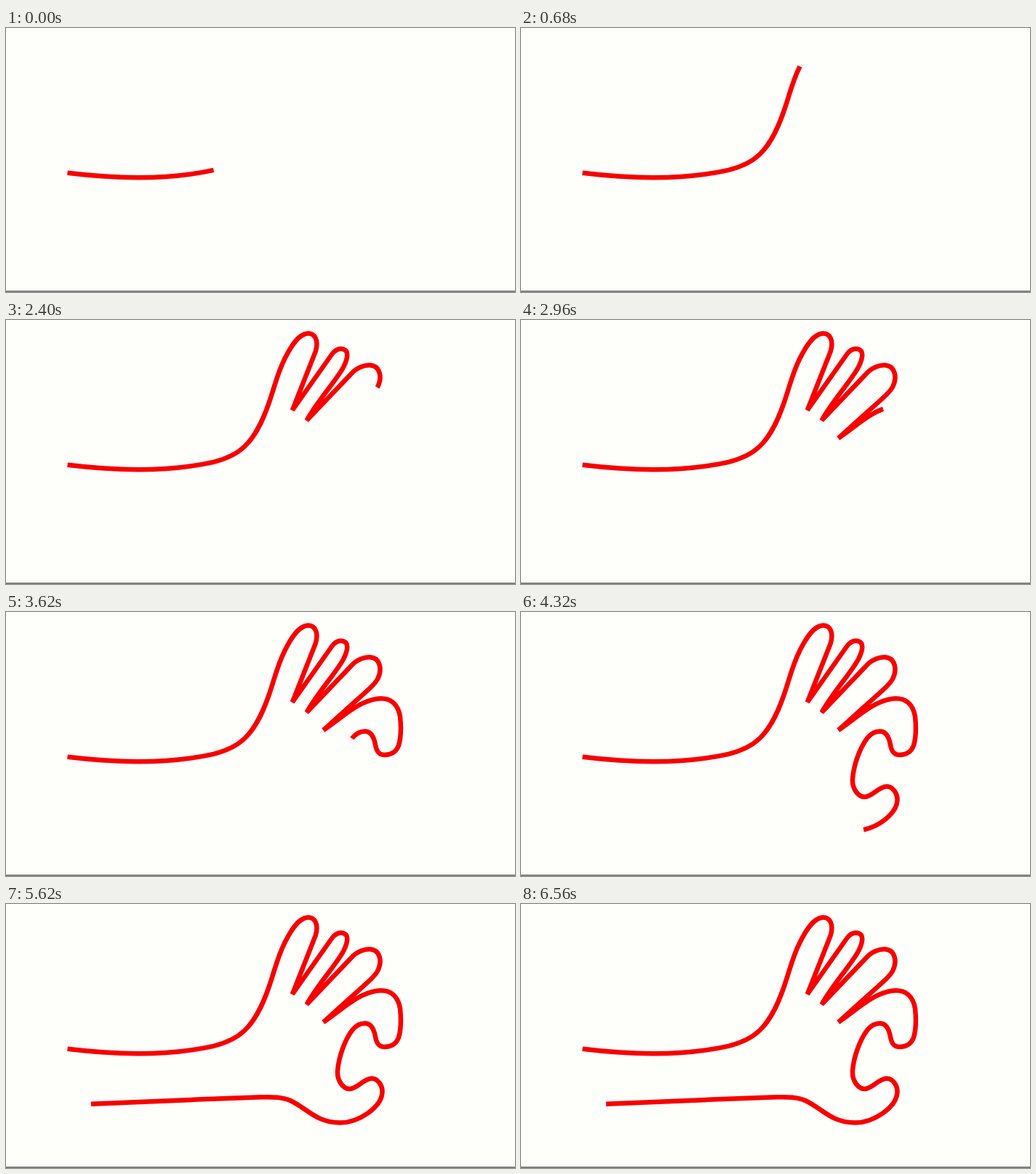
An HTML page for the animation above (6660 ms loop, 700 by 364 pixels).

```html
<!DOCTYPE html>
<html lang="en">
<head>
<meta charset="utf-8">
<title>Hand outline</title>
<style>
  html, body { margin: 0; width: 100%; height: 100%; overflow: hidden; background: #fefefb; }
  svg { display: block; width: 700px; height: 364px; }
  #hand { fill: none; stroke: #f80000; stroke-width: 6.5; }
</style>
</head>
<body>
<svg viewBox="0 0 700 364">
  <rect y="362" width="700" height="2" fill="#808080"/>
  <path id="hand"/>
</svg>
<script>
const LOOP = 6660;

// Each stretch of the outline, with the step at which the pen reaches its end.
const strokes = [
  [0, 'M84.5 199.8C150 207.8 220 210.5 285.5 195.8'],
  [14, 'C302 191.7 317 185 328 174.5C346 157.5 357 130 366 101C371 85 375 70 383.5 53'],
  [35, 'C392 36 402 19.5 415 18.5C423.5 18 431 26.5 425.5 44L393.8 124.5' +
       'L448 47.5C455 38 464 38 468 43C471 48 468 57 464.3 64.5'],
  [52, 'C454 84 430 109 413.5 138.5L474 75C482 65.5 494 61.5 502 62.5C514 64 518 79 511 92.5'],
  [77, 'C505 103 494 110 436.5 163C462 146 485 122 512 119.5C529 118 539 127 542 144' +
       'C543.5 158 543.5 172 540 184C536.5 193.5 529 197 520.5 197C511 197 509 189 508 183' +
       'C506 172 502 164.5 493.5 164.5C487 164.5 481 168 476.5 173.5'],
  [107, 'C466 187 457.5 211 456 230C455 244 464 255 472.5 255C483 255 492 240.5 503 240.5' +
        'C511 240.5 518 250 517.5 259.5C516.5 281 484 301.5 460 301.5' +
        'C427 302 413 281 391 271C380 266 367 266 352 266.3L263 269.6'],
  [117, 'L117 275.8']
];

const hand = document.getElementById('hand');
let outline = '';
const stops = strokes.map(([step, d]) => {
  outline += d;
  hand.setAttribute('d', outline);
  return { step, length: hand.getTotalLength() };
});

// Steps come in threes, held for 20, 20 and 100 ms.
function stepAt(ms) {
  const u = ms + 20, r = u % 140;
  return 3 * Math.floor(u / 140) + (r < 20 ? 0 : r < 40 ? 1 : 2) - 1;
}

function lengthAt(step) {
  const i = stops.findIndex(s => s.step >= step);
  if (i < 0) return stops[stops.length - 1].length + 1;
  if (i === 0) return stops[0].length;
  const a = stops[i - 1], b = stops[i];
  return a.length + (b.length - a.length) * (step - a.step) / (b.step - a.step);
}

const start = performance.now();
function draw() {
  const ms = (performance.now() - start) % LOOP;
  hand.setAttribute('stroke-dasharray', lengthAt(stepAt(ms)) + ' 4000');
  requestAnimationFrame(draw);
}
draw();
</script>
</body>
</html>
```
